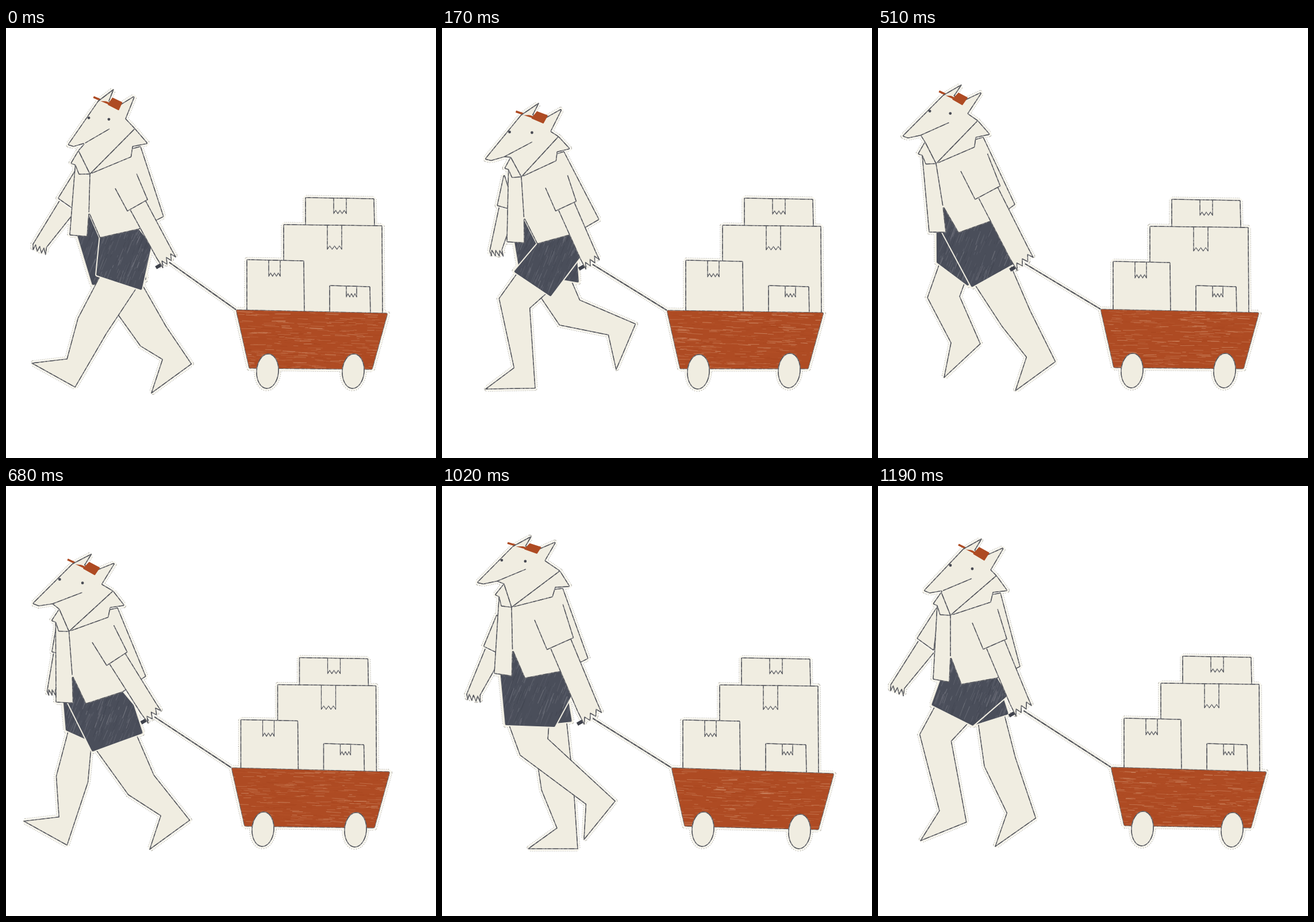
Write an HTML page with a canvas that moves like this. It is 748 px wide and 748 px high and loops after 1.36 s.

```html
<!DOCTYPE html>
<html lang="en">
<head>
<meta charset="utf-8">
<title>Cart walk</title>
<style>
html, body { margin: 0; width: 100%; height: 100%; overflow: hidden; background: #fff; }
canvas { display: block; width: 748px; height: 748px; }
</style>
</head>
<body>
<canvas id="stage" width="748" height="748"></canvas>
<script>
const g = document.getElementById('stage').getContext('2d');
const STEP = 170;
const CREAM = '#f0ede1', NAVY = '#4a4e5a', RUST = '#ae4b23';

// Joints of each pose.
// head: nose, nape, ear tip. body: collar V, shoulder, front hem, back hem.
// arms: top, wrist. legs: both ends of the cuff, knee, toe, angle of the sole.
// seam: where the front leg of the shorts meets the hem. cart: its two top corners.
const stride = {
  head: [108,203, 208,158, 187,107], body: [146,254, 234,206, 111,360, 274,328],
  arm: [190,279, 262,400], farArm: [124,242, 47,376],
  near: [157,430, 236,456, 150,518, 45,583, 29], far: [150,447, 244,438, 256,536, 253,635, -36],
  seam: [1], cart: [400,490, 664,496], load: [0, 0]
};
const press = {
  head: [75,228, 189,180, 168,131], body: [138,259, 212,215, 113,372, 273,333],
  arm: [180,278, 241,402], farArm: [108,254, 83,388],
  near: [125,424, 189,467, 126,479, 76,628, -1], far: [135,425, 238,443, 222,495, 303,594, -67],
  seam: [1], cart: [391,491, 664,495], load: [5, 1]
};
const push = {
  head: [43,188, 156,149, 145,99], body: [101,236, 183,190, 89,355, 238,307],
  arm: [144,249, 229,400], farArm: [90,228, 93,330],
  near: [163,451, 240,408, 240,505, 239,631, -36], far: [102,408, 157,449, 114,468, 115,608, -43],
  seam: [.45], cart: [387,489, 663,495], load: [-10, 3]
};
const sink = {
  head: [50,213, 177,185, 152,130], body: [118,262, 205,226, 85,389, 248,347],
  arm: [156,295, 240,390], farArm: [86,254, 50,384],
  near: [137,464, 220,440, 188,472, 283,625, -61], far: [100,438, 147,452, 96,496, 66,632, -2],
  seam: [.35], cart: [393,490, 664,499], load: [-11, 4]
};
const pass = {
  head: [61,168, 179,130, 155,88], body: [121,211, 210,178, 91,326, 254,300],
  arm: [161,233, 236,392], farArm: [96,222, 43,362],
  near: [110,416, 196,419, 160,454, 247,615, -51], far: [150,418, 226,410, 201,525, 150,631, 0],
  seam: [.2], cart: [399,490, 682,500], load: [0, 4]
};
const reach = {
  head: [80,182, 196,146, 180,92], body: [126,225, 213,186, 96,336, 247,314],
  arm: [164,238, 230,380], farArm: [103,210, 22,346],
  near: [93,381, 165,417, 100,438, 74,617, -22], far: [170,415, 227,397, 212,480, 204,627, -35],
  seam: [.25], cart: [405,489, 676,497], load: [9, 1]
};

// Halfway pose: upper body nudged by (dx, dy), some joints replaced.
function between(a, b, dx, dy, own) {
  const p = {};
  for (const k in a) {
    const nudge = k === 'head' || k === 'body' ? [dx, dy] : [0, 0];
    p[k] = a[k].map((v, i) => (v + b[k][i]) / 2 + nudge[i % 2]);
  }
  return Object.assign(p, own);
}
const poses = [
  stride, press,
  between(press, push, -12, 10, {
    near: [125,430, 215,435, 195,520, 140,631, 0], far: [130,430, 200,440, 155,470, 245,612, -51]
  }),
  push,
  between(push, sink, 0, 4, {
    near: [150,462, 238,430, 235,520, 250,632, -36], far: [104,425, 155,448, 115,510, 31,583, 29],
    cart: [392,490, 668,497]
  }),
  sink, pass, reach
];

const pairs = a => Array.from({ length: a.length >> 1 }, (_, i) => [a[2 * i], a[2 * i + 1]]);
const add = (a, b) => [a[0] + b[0], a[1] + b[1]];
const sub = (a, b) => [a[0] - b[0], a[1] - b[1]];
const lerp = (a, b, k) => [a[0] + (b[0] - a[0]) * k, a[1] + (b[1] - a[1]) * k];
const unit = v => { const d = Math.hypot(...v) || 1; return [v[0] / d, v[1] / d]; };
const left = v => [-v[1], v[0]];
const turn = (v, a) => [v[0] * Math.cos(a) - v[1] * Math.sin(a), v[0] * Math.sin(a) + v[1] * Math.cos(a)];

// Cut-out pieces, drawn in the reach pose and refitted to the joints of the others.
const piece = {
  head: pairs([80,182, 148,110, 180,92, 168,112, 190,120, 219,107, 196,146]),
  jaw: pairs([113,182, 90,186]),
  face: pairs([126,138, 164,144, 163,161]),
  cap: pairs([140,102, 168,116, 176,106, 194,116, 185,130, 165,118]),
  collar: pairs([110,185, 96,205, 103,208, 108,224, 126,225, 196,202, 200,185, 225,182, 206,156]),
  hem: pairs([96,336, 124,341, 126,296, 145,345, 207,334, 247,314]),
  sleeve: pairs([164,238, 183,284, 224,266, 208,214]),
  arm: pairs([189,283, 230,380, 240,400, 267,382, 260,366, 220,268]),
  farSleeve: pairs([103,210, 68,265, 97,286, 101,250]),
  farArm: pairs([70,270, 22,346, 22,356, 44,365, 46,352, 97,290])
};

// Map that carries two or three joints onto their new places.
function fit(from, to) {
  const axes = ([a, b, c]) => { const u = sub(b, a); return [u, c ? sub(c, a) : left(u)]; };
  const [u, v] = axes(from), [U, V] = axes(to);
  const det = u[0] * v[1] - v[0] * u[1];
  const map = p => {
    const d = sub(p, from[0]);
    const s = (d[0] * v[1] - v[0] * d[1]) / det, t = (u[0] * d[1] - d[0] * u[1]) / det;
    return [to[0][0] + s * U[0] + t * V[0], to[0][1] + s * U[1] + t * V[1]];
  };
  return pts => pts.map(map);
}
const refit = (key, p, pick = a => a) => fit(pick(pairs(reach[key])), pick(pairs(p[key])));

// Leg with a tapering knee and a wedge foot, front side first.
function legShape(leg) {
  const [a, b, knee, toe] = pairs(leg), sole = leg[8] * Math.PI / 180;
  const ankle = add(toe, turn([50, -36], sole)), heel = add(toe, turn([86, 0], sole));
  const thigh = unit(sub(knee, lerp(a, b, .5))), shin = unit(sub(lerp(ankle, heel, .5), knee));
  const [nx, ny] = left(unit(add(thigh, shin)));
  const w = 28;
  return [lerp(a, b, .08), add(knee, [nx * w, ny * w]), ankle, toe, heel,
          sub(knee, [nx * w, ny * w]), lerp(a, b, .88)];
}

// Four fingers between the first and last fingertip.
function handShape([top, wrist, first, last, wrist2, top2]) {
  const [ix, iy] = unit(sub(lerp(wrist, wrist2, .5), lerp(first, last, .5)));
  const fingers = Array.from({ length: 7 }, (_, i) =>
    add(lerp(first, last, i / 6), i % 2 ? [ix * 10, iy * 10] : [0, 0]));
  return [top, wrist, ...fingers, wrist2, top2];
}

let seed = 1;
const rand = () => (seed = seed * 16807 % 2147483647) / 2147483647;

function polyline(pts) {
  const path = new Path2D();
  pts.forEach(p => path.lineTo(...p));
  return path;
}
function polygon(pts, r = 1) {
  const path = new Path2D(), n = pts.length;
  path.moveTo(...lerp(pts[n - 1], pts[0], .5));
  pts.forEach((p, i) => path.arcTo(...p, ...pts[(i + 1) % n], r));
  path.closePath();
  return path;
}
function stroke(path, color, width, dash = []) {
  g.setLineDash(dash);
  g.strokeStyle = color;
  g.lineWidth = width;
  g.stroke(path);
  g.setLineDash([]);
}
function pencil(path, width = 1.6) {
  stroke(path, '#77787c', width);
  stroke(path, '#4c4e55', width * .7, [5, 4, 9, 5, 2, 3]);
}

// Crayon strokes inside a shape.
function crayon(path, pts, angle, count, tones) {
  const xs = pts.map(p => p[0]), ys = pts.map(p => p[1]);
  const x0 = Math.min(...xs), y0 = Math.min(...ys);
  const w = Math.max(...xs) - x0, h = Math.max(...ys) - y0;
  g.save();
  g.clip(path);
  for (let i = 0; i < count; i++) {
    const at = [x0 + rand() * w, y0 + rand() * h];
    const end = add(at, turn([4 + rand() * 24, 0], angle + (rand() - .5) * .1));
    g.globalAlpha = .2 + rand() * .45;
    stroke(polyline([at, end]), tones[i % tones.length], .5 + rand() * .8);
  }
  g.restore();
}

function draw(p, index) {
  const jobs = [], outlines = [];
  const shape = (pts, { open, halo = true } = {}) => {
    const path = polygon(pts), edge = open ? polyline(pts) : path;
    if (halo) outlines.push(path);
    jobs.push(() => { g.fillStyle = CREAM; g.fill(path); pencil(edge); });
  };
  const line = (pts, width) => jobs.push(() => pencil(polyline(pts), width));
  const cloth = pts => {
    const path = polygon(pts, 2);
    outlines.push(path);
    jobs.push(() => {
      stroke(path, CREAM, 4);
      g.fillStyle = NAVY;
      g.fill(path);
      crayon(path, pts, -1.2, 260, ['#737680', '#3d414c', '#80828b']);
    });
  };

  const [neck, shoulder, , tail] = pairs(p.body);
  const collar = refit('body', p, a => a.slice(0, 2))(piece.collar);
  const hem = refit('body', p, ([v, , front, back]) => [v, front, back])(piece.hem);
  const [front, , slit, flap, waist] = hem;

  // Far side, then near side of the lower body.
  const farArm = refit('farArm', p), nearCuff = pairs(p.near), farCuff = pairs(p.far);
  shape(handShape(farArm(piece.farArm)), { open: true });
  shape(farArm(piece.farSleeve));
  shape(legShape(p.far), { open: true });
  cloth([lerp(front, flap, .25), slit, waist, farCuff[1], farCuff[0]]);
  shape(legShape(p.near), { open: true });
  cloth([nearCuff[0], lerp(front, flap, p.seam[0]), slit, waist, add(tail, [-21, 50]), nearCuff[1]]);

  shape([collar[2], ...hem, shoulder]);
  line([neck, slit]);

  // Parcels: x, y, width, tape x, tape width, tape length.
  const [dx, dy] = p.load;
  const parcels = [[521, 295, 119, 49, 22, 26], [483, 342, 171, 76, 25, 41],
                   [419, 403, 99, 38, 20, 27], [563, 448, 70, 29, 18, 18]];
  parcels.forEach(([x, y, w, tx, tw, len], i) => {
    x += dx;
    y += i < 3 ? dy : 0;
    const bottom = i ? 500 : 345 + dy, tape = x + tx;
    shape([[x, y], [x + w, y + 2], [x + w + 1, bottom], [x, bottom]]);
    const teeth = Array.from({ length: 7 }, (_, k) => [tape + tw * k / 6, y + len + 2 - (k % 2 ? 6 : 0)]);
    line([[tape, y + 1], ...teeth, [tape + tw, y + 1]], 1.3);
  });

  const [hitch, rear] = pairs(p.cart);
  const cart = [hitch, rear, add(rear, [-27, 98]), add(hitch, [23, 102])];
  const body = polygon(cart, 2);
  outlines.push(body);
  jobs.push(() => {
    g.fillStyle = RUST;
    g.fill(body);
    crayon(body, cart, .03, 560, ['#d59a78', '#a3421c', '#cf8a64', '#b5532a']);
    pencil(body, .8);
  });
  for (const [x, y] of [add(cart[3], [32, 5]), add(cart[2], [-33, 3])]) {
    const wheel = new Path2D();
    wheel.ellipse(x, y, 19, 30, .07, 0, 7);
    outlines.push(wheel);
    jobs.push(() => { g.fillStyle = CREAM; g.fill(wheel); pencil(wheel); });
  }

  const armFit = refit('arm', p), arm = armFit(piece.arm);
  const pull = polyline([lerp(arm[2], arm[3], .5), hitch]);
  outlines.push(pull);
  jobs.push(() => {
    pencil(pull, 2.2);
    stroke(polyline([add(arm[2], [-12, 0]), add(arm[2], [0, -7])]), '#3f424c', 6);
  });
  shape(handShape(arm), { open: true });
  shape(armFit(piece.sleeve), { open: true, halo: false });

  const headFit = refit('head', p);
  const head = headFit(piece.head), jaw = headFit(piece.jaw), cap = headFit(piece.cap);
  const [eye, eye2, mouth] = headFit(piece.face);
  shape([...head, collar[8], neck, collar[0], ...jaw]);
  line([jaw[0], mouth]);
  jobs.push(() => {
    stroke(polyline(cap.slice(0, 2)), RUST, 3.5);
    g.fillStyle = RUST;
    g.fill(polygon(cap.slice(2)));
    g.fillStyle = '#494b54';
    for (const e of [eye, eye2]) {
      g.beginPath();
      g.arc(...e, 2.4, 0, 7);
      g.fill();
    }
  });
  shape(head.slice(1, 4), { open: true, halo: false });
  shape(collar.slice(0, 5));
  shape(collar.slice(4));

  seed = 71 + index * 977;
  g.clearRect(0, 0, 748, 748);
  g.lineJoin = 'round';
  // Paper rim with a speckled edge.
  outlines.forEach(o => stroke(o, '#a3a198', 9.2, [1.2, 2]));
  outlines.forEach(o => stroke(o, '#f8f6ee', 7.6));
  jobs.forEach(job => job());
}

let shown = -1;
function tick() {
  const i = Math.floor(performance.now() / STEP) % poses.length;
  if (i !== shown) draw(poses[shown = i], i);
  requestAnimationFrame(tick);
}
tick();
</script>
</body>
</html>
```
